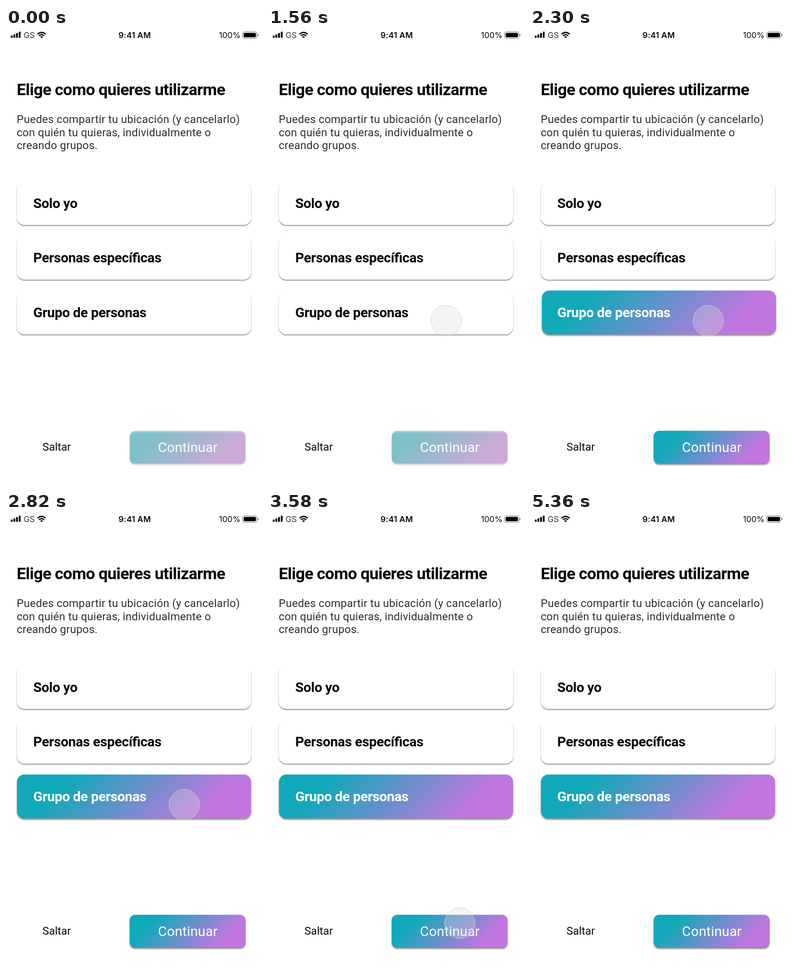
Animation of 561 by 998 pixels, one loop 5.86 s. Source, as an HTML page:

```html
<!DOCTYPE html>
<html lang="es">
<head>
<meta charset="utf-8">
<title>Elige como quieres utilizarme</title>
<style>
  html, body { margin: 0; width: 100%; height: 100%; overflow: hidden; background: #fff; }
  svg { display: block; width: 100%; height: 100%; }
  text { font-family: Roboto, sans-serif; fill: #08080a; }
  .status { font: 17.8px Inter, sans-serif; }
  .title { font-size: 35.9px; font-weight: 700; letter-spacing: -.74px; }
  .body { font-size: 23.94px; letter-spacing: .3px; fill: #2e2d33; }
  .label { font-size: 29.92px; font-weight: 700; letter-spacing: -.37px; font-feature-settings: "liga"; }
  .skip { font-size: 23.94px; }
  .go { font-size: 29.92px; letter-spacing: .15px; fill: #fff; text-anchor: middle; }
  .white { fill: #fff; }
  .card { fill: #fff; filter: drop-shadow(0 2px 1px rgba(0, 0, 0, .45)); }
  .raised { filter: drop-shadow(0 3px 1.5px rgba(0, 0, 0, .45)); }
</style>
</head>
<body>
<svg viewBox="0 0 561 998">
  <defs>
    <linearGradient id="wide" gradientUnits="userSpaceOnUse" x1="0" y1="0" x2="304.5" y2="304.5">
      <stop offset=".2" stop-color="#11a9b9"/><stop offset=".8" stop-color="#c076de"/>
    </linearGradient>
    <linearGradient id="small" gradientUnits="userSpaceOnUse" x1="0" y1="0" x2="163" y2="163">
      <stop offset=".2" stop-color="#11a9b9"/><stop offset=".8" stop-color="#c076de"/>
    </linearGradient>
  </defs>

  <g id="statusBar">
    <rect x="10.5" y="16.5" width="4" height="5" rx="1"/>
    <rect x="16.3" y="14" width="4" height="7.5" rx="1"/>
    <rect x="22.1" y="11" width="4" height="10.5" rx="1"/>
    <rect x="28" y="8" width="4" height="13.5" rx="1"/>
    <text class="status" x="38.5" y="21.7" style="fill:#333">GS</text>
    <g fill="none" stroke="#000" stroke-width="2.7">
      <path d="M69 13.6Q78 5.8 87 13.6M72.2 17Q78 12.2 83.8 17"/>
    </g>
    <path d="M75 19.2Q78 16.8 81 19.2L78 22.3Z"/>
    <text class="status" x="282" y="21.7" text-anchor="middle" style="font-weight:600;letter-spacing:.2px">9:41 AM</text>
    <text class="status" x="514" y="21.7" text-anchor="end">100%</text>
    <rect x="518.5" y="8.5" width="31.5" height="14" rx="4" fill="none" stroke="#666" stroke-width="1.1"/>
    <rect x="520.8" y="10.8" width="26.9" height="9.4" rx="2.2"/>
    <path d="M551.3 13Q553.6 13.7 553.6 15.5T551.3 18Z" fill="#777"/>
  </g>

  <text class="title" x="23.5" y="147">Elige como quieres utilizarme</text>
  <text class="body" x="23.5" y="208.3">Puedes compartir tu ubicación (y cancelarlo)</text>
  <text class="body" x="23.5" y="236.8">con quién tu quieras, individualmente o</text>
  <text class="body" x="23.5" y="265.3">creando grupos.</text>

  <rect class="card" x="24" y="335.2" width="513" height="95.8" rx="16"/>
  <rect class="card" x="24" y="454.9" width="513" height="95.8" rx="16"/>
  <rect class="card" id="plainCard" x="24" y="574.6" width="513" height="95.8" rx="16"/>
  <g class="raised" id="slide">
    <rect id="slideFill" width="513" height="95.8" rx="16" fill="url(#wide)"/>
  </g>
  <text class="label" x="59.8" y="393.5">Solo yo</text>
  <text class="label" x="59.8" y="513.2">Personas específicas</text>
  <text class="label" id="groupLabel" x="59.8" y="633">Grupo de personas</text>

  <text class="skip" x="80" y="924.8">Saltar</text>
  <g class="raised" transform="translate(271 881.5)">
    <rect id="buttonFill" width="254" height="71.8" rx="12" fill="url(#small)"/>
  </g>
  <text class="go" x="398.5" y="927.8">Continuar</text>

  <circle id="touch"/>
</svg>
<script>
const LOOP = 5860, STEP = 20, SELECT = 1940, SPRING_START = 1912.4, DIMMED = .42;
const $ = id => document.getElementById(id);
const set = (el, attrs) => { for (const k in attrs) el.setAttribute(k, attrs[k]); };
const clamp = v => Math.min(1, Math.max(0, v));

const linear = u => u;
const easeOut = u => 1 - (1 - u) ** 2;
const easeInOut = u => u * u * (3 - 2 * u);

// Touch path: time, x, y, easing of the way to this point
const path = [
  [540, 472, 6],
  [720, 320, 410, easeOut],
  [1010, 320, 410],
  [1220, 248, 638, easeInOut],
  [1420, 248, 638],
  [1560, 390.5, 640.5, easeInOut],
  [2960, 390.5, 640.5],
  [3220, 361, 745, easeInOut],
  [3400, 390, 850, linear],
  [3580, 420.5, 900, easeOut],
  [3860, 437, 918, easeOut],
  [4820, 437, 918],
  [5100, 488, 25.5, easeInOut],
  [5300, 488, 25.5],
  [5360, 496, -36, easeInOut]
];
const presses = [1940, 4340];

function touchAt(t) {
  const i = path.findIndex(p => p[0] > t);
  if (i < 1) return null;
  const [t0, x0, y0] = path[i - 1], [t1, x1, y1, ease = linear] = path[i];
  const u = ease((t - t0) / (t1 - t0));
  return [x0 + (x1 - x0) * u, y0 + (y1 - y0) * u];
}

// Damped spring: mass 1, stiffness 300, damping 20
function spring(ms) {
  const s = ms / 1000, w = Math.sqrt(200);
  return 1 - Math.exp(-10 * s) * (Math.cos(w * s) + 10 / w * Math.sin(w * s));
}

function draw(t) {
  const selected = t >= SELECT;
  const p = selected ? spring(t - SPRING_START) : 0;
  set($('plainCard'), { visibility: selected ? 'hidden' : 'visible' });
  set($('slide'), { transform: `translate(${561 - 537 * p} 574.6)`, visibility: selected ? 'visible' : 'hidden' });
  set($('slideFill'), { opacity: clamp(p) });
  set($('buttonFill'), { opacity: DIMMED + (1 - DIMMED) * clamp(p) });
  $('groupLabel').classList.toggle('white', selected);

  const pos = touchAt(t);
  set($('touch'), { visibility: pos ? 'visible' : 'hidden' });
  if (!pos) return;
  const pressed = presses.includes(t);
  set($('touch'), {
    cx: pos[0], cy: pos[1], r: pressed ? 31.5 : 33.5,
    fill: pressed ? 'rgba(222,222,222,.68)' : 'rgba(220,220,220,.3)',
    stroke: 'rgba(203,206,210,.95)'
  });
}

const start = performance.now();
function tick() {
  const t = (performance.now() - start) % LOOP;
  draw(Math.floor(t / STEP) * STEP);
  requestAnimationFrame(tick);
}
tick();
</script>
</body>
</html>
```
